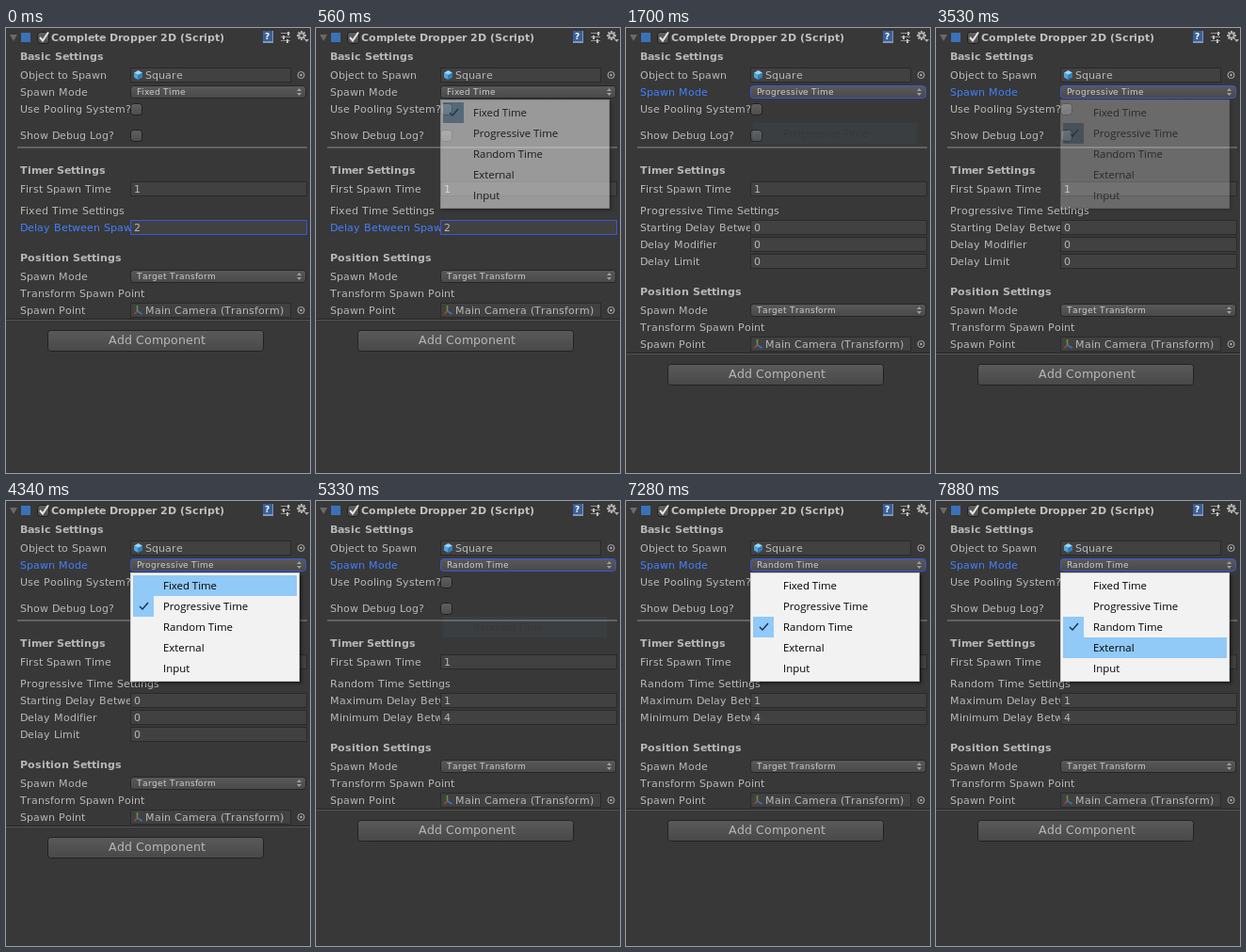
An HTML page with a canvas for the animation above (8000 ms loop, 323 px wide and 473 px high).

```html
<!DOCTYPE html>
<html lang="en">
<head>
<meta charset="utf-8">
<title>Inspector panel</title>
<style>
  html, body { margin: 0; width: 100%; height: 100%; overflow: hidden; background: #383838; }
  canvas { position: absolute; left: 0; top: 0; }
</style>
</head>
<body>
<canvas id="panel" width="323" height="473"></canvas>
<canvas id="menu" width="323" height="473"></canvas>
<script>
const LOOP = 8000;
const STEP = 30;
const FADE_IN = 150;
const FADE_OUT = 240;
const TEXT = '#b8b8b8';
const BLUE = '#4080ff';
const OUTLINE = '#3a56dc';
const HOVER = '#91c9f7';
const SANS = '"DejaVu Sans", Verdana, sans-serif';

const menuItems = ['Fixed Time', 'Progressive Time', 'Random Time', 'External', 'Input'];

const modes = [
  [['Delay Between Spawns', '2']],
  [['Starting Delay Between', '0'], ['Delay Modifier', '0'], ['Delay Limit', '0']],
  [['Maximum Delay Between', '1'], ['Minimum Delay Between', '4']]
];

// Each visit to the menu: opening time, first opacity, [time, row] hovers, time of choice.
const visits = [
  { open: 500, alpha: 0.2, hovers: [[860, 0], [1010, 1]], pick: 1460 },
  { open: 3530, alpha: 0.27, hovers: [[4340, 0], [4400, 1], [4610, 2]], pick: 5090 },
  { open: 7130, alpha: 0.14, hovers: [[7640, 0], [7730, 1], [7790, 2], [7880, 3]], pick: Infinity }
];

const menuCanvas = document.getElementById('menu');
const menu = menuCanvas.getContext('2d');
const ctx = document.getElementById('panel').getContext('2d');

function rect(x, y, w, h, color) {
  ctx.fillStyle = color;
  ctx.fillRect(x, y, w, h);
}

function line(points, color, width = 1, target = ctx) {
  target.strokeStyle = color;
  target.lineWidth = width;
  target.beginPath();
  points.forEach(([x, y]) => target.lineTo(x, y));
  target.stroke();
}

function polygon(points, color) {
  ctx.fillStyle = color;
  ctx.beginPath();
  points.forEach(([x, y]) => ctx.lineTo(x, y));
  ctx.fill();
}

function disc(x, y, r, color) {
  ctx.fillStyle = color;
  ctx.beginPath();
  ctx.arc(x, y, r, 0, Math.PI * 2);
  ctx.fill();
}

// Whole-pixel letter advances, as in hinted interface text; near-halves round up.
function text(string, x, baseline, { color = TEXT, size = 11, bold = false } = {}) {
  ctx.font = `${bold ? 'bold ' : ''}${size}px ${SANS}`;
  ctx.fillStyle = color;
  for (const letter of string) {
    ctx.fillText(letter, x, baseline);
    x += Math.round(ctx.measureText(letter).width + 0.02);
  }
}

function raised(x, y, w, h, border, top = '#5a5a5a', bottom = '#484848') {
  const shade = ctx.createLinearGradient(0, y, 0, y + h);
  shade.addColorStop(0, top);
  shade.addColorStop(1, bottom);
  ctx.beginPath();
  ctx.roundRect(x + 0.5, y + 0.5, w - 1, h - 1, 3);
  ctx.fillStyle = shade;
  ctx.fill();
  ctx.strokeStyle = border;
  ctx.lineWidth = 1;
  ctx.stroke();
}

function box(x, y, w, border = '#2a2a2a') {
  rect(x, y, w, 16, border);
  rect(x + 1, y + 1, w - 2, 14, '#414141');
}

// Row positions below are the vertical centres of their text.
function heading(label, y) {
  text(label, 15, y + 4, { bold: true });
}

function label(string, y, focused) {
  text(string, 15, y + 4, { color: focused ? BLUE : TEXT });
}

function numberRow(name, value, y, focused) {
  label(name, y, focused);
  box(132, y - 8, 188, focused ? OUTLINE : undefined);
  text(value, 136, y + 4);
}

function dropdownRow(name, value, y, focused) {
  label(name, y, focused);
  raised(132, y - 7, 187, 14, focused ? OUTLINE : '#262626');
  text(value, 139, y + 3, { size: 9, color: '#cccccc' });
  polygon([[309, y - 1], [314, y - 1], [311.5, y - 4]], '#a0a0a0');
  polygon([[309, y + 1], [314, y + 1], [311.5, y + 4]], '#a0a0a0');
}

function objectRow(name, value, y, drawIcon) {
  label(name, y);
  box(132, y - 8, 171);
  drawIcon(140.5, y);
  text(value, 148, y + 4);
  ctx.strokeStyle = '#b0b0b0';
  ctx.lineWidth = 1;
  ctx.beginPath();
  ctx.arc(313.5, y, 3.5, 0, Math.PI * 2);
  ctx.stroke();
  disc(313.5, y, 1.2, '#b0b0b0');
}

function checkbox(x, y) {
  raised(x, y, 13, 13, '#1f1f1f', '#606060', '#4c4c4c');
}

function checkRow(name, y) {
  label(name, y);
  checkbox(132, y - 6);
}

function cubeIcon(x, y) {
  polygon([[x, y - 5], [x + 4.5, y - 2.5], [x, y], [x - 4.5, y - 2.5]], '#98d4f4');
  polygon([[x - 4.5, y - 2.5], [x, y], [x, y + 5], [x - 4.5, y + 2.5]], '#50a6de');
  polygon([[x + 4.5, y - 2.5], [x, y], [x, y + 5], [x + 4.5, y + 2.5]], '#2f7fbd');
}

function axesIcon(x, y) {
  line([[x - 1, y + 1], [x - 1, y - 5]], '#5fa02c', 1.5);
  line([[x - 1, y + 1], [x - 4, y + 4]], '#c83c28', 1.5);
  line([[x - 1, y + 1], [x + 4, y + 4]], '#3478c4', 1.5);
}

function header() {
  polygon([[4, 7], [12, 7], [8, 14]], '#6a6a6a');
  rect(16, 5, 10, 10, '#3a72b8');
  checkbox(33, 4);
  line([[36, 10], [39, 13.5], [45, 4.5]], '#e4e4e4', 2);
  text('Complete Dropper 2D (Script)', 48, 14, { bold: true, color: '#c0c0c0' });

  rect(273, 3, 11, 13, '#8098b8');
  rect(273, 3, 10, 11, '#3a5f98');
  text('?', 275, 12, { bold: true, size: 9, color: '#ffffff' });

  [[6, 299], [10, 294], [14, 298]].forEach(([y, knob]) => {
    line([[292, y - 0.5], [302, y - 0.5]], '#929292');
    rect(knob, y - 2, 2, 4, '#c0c0c0');
  });

  for (let i = 0; i < 8; i++) {
    const angle = i * Math.PI / 4;
    line([[314, 8], [314 + 5 * Math.cos(angle), 8 + 5 * Math.sin(angle)]], '#b0b0b0', 2);
  }
  disc(314, 8, 3.5, '#b0b0b0');
  disc(314, 8, 1.7, '#383838');
  polygon([[317, 12], [322, 12], [319.5, 15]], '#b0b0b0');
}

function drawPanel(mode) {
  const untouched = mode === 0;
  rect(0, 0, 323, 473, '#383838');
  header();

  heading('Basic Settings', 30);
  objectRow('Object to Spawn', 'Square', 50, cubeIcon);
  dropdownRow('Spawn Mode', menuItems[mode], 68, !untouched);
  checkRow('Use Pooling System?', 86);
  checkRow('Show Debug Log?', 114);
  rect(12, 126, 308, 2, '#626262');

  heading('Timer Settings', 151);
  numberRow('First Spawn Time', '1', 171);
  label(menuItems[mode] + ' Settings', 194);
  modes[mode].forEach(([name, value], i) => numberRow(name, value, 212 + 18 * i, untouched));

  const shift = 18 * (modes[mode].length - 1);
  heading('Position Settings', 244 + shift);
  dropdownRow('Spawn Mode', 'Target Transform', 264 + shift);
  label('Transform Spawn Point', 282 + shift);
  objectRow('Spawn Point', 'Main Camera (Transform)', 300 + shift, axesIcon);
  rect(0, 309 + shift, 323, 1, '#262626');
  rect(0, 310 + shift, 323, 1, '#555555');

  raised(44, 321 + shift, 230, 23, '#222222');
  text('Add Component', 109, 336 + shift, { size: 12.5 });
}

function menuRow(row, hovered) {
  const y = 79 + 22 * row;
  if (hovered) {
    menu.fillStyle = HOVER;
    menu.fillRect(135, y, 174, 22);
  }
  menu.font = '11.4px "Open Sans", "Noto Sans", sans-serif';
  menu.fillStyle = '#000000';
  menu.fillText(menuItems[row], 167, y + 15);
}

function drawMenu(checked, hovered, opacity) {
  menuCanvas.style.opacity = opacity;
  menu.save();
  menu.shadowColor = 'rgba(0, 0, 0, 0.5)';
  menu.shadowBlur = 3;
  menu.shadowOffsetX = menu.shadowOffsetY = 2;
  menu.fillStyle = '#cccccc';
  menu.fillRect(132, 76, 180, 116);
  menu.restore();
  menu.fillStyle = '#f2f2f2';
  menu.fillRect(133, 77, 178, 114);
  menuItems.forEach((_, row) => menuRow(row, row === hovered));

  const y = 79 + 22 * checked;
  if (opacity < 1) menu.clearRect(135, y, 22, 22);
  menu.globalAlpha = opacity < 1 ? 0.65 : 1;
  menu.fillStyle = checked === hovered ? '#56b0fa' : HOVER;
  menu.fillRect(135, y, 22, 22);
  menu.globalAlpha = 1;
  line([[142, y + 11], [145, y + 14], [151, y + 7]], '#103050', 1.4, menu);
}

// The chosen row lingers and fades to a faint trace.
function drawChosen(row, elapsed) {
  menuCanvas.style.opacity = 1 - 0.96 * Math.min(1, elapsed / FADE_OUT);
  menuRow(row, true);
}

function render(time) {
  const mode = visits.filter(visit => time >= visit.pick).length;
  drawPanel(mode);
  menu.clearRect(0, 0, 323, 473);

  const visit = visits[mode];
  if (time >= visit.open) {
    const progress = Math.min(1, Math.floor((time - visit.open) / STEP) * STEP / FADE_IN);
    const hover = visit.hovers.filter(([start]) => time >= start).pop();
    drawMenu(mode, hover ? hover[1] : -1, visit.alpha + (1 - visit.alpha) * progress);
  } else if (mode > 0) {
    const elapsed = time - visits[mode - 1].pick;
    drawChosen(mode, Math.floor(elapsed / STEP) * STEP);
  }
}

const start = performance.now();
function tick() {
  render((performance.now() - start) % LOOP);
  requestAnimationFrame(tick);
}
tick();
</script>
</body>
</html>
```
